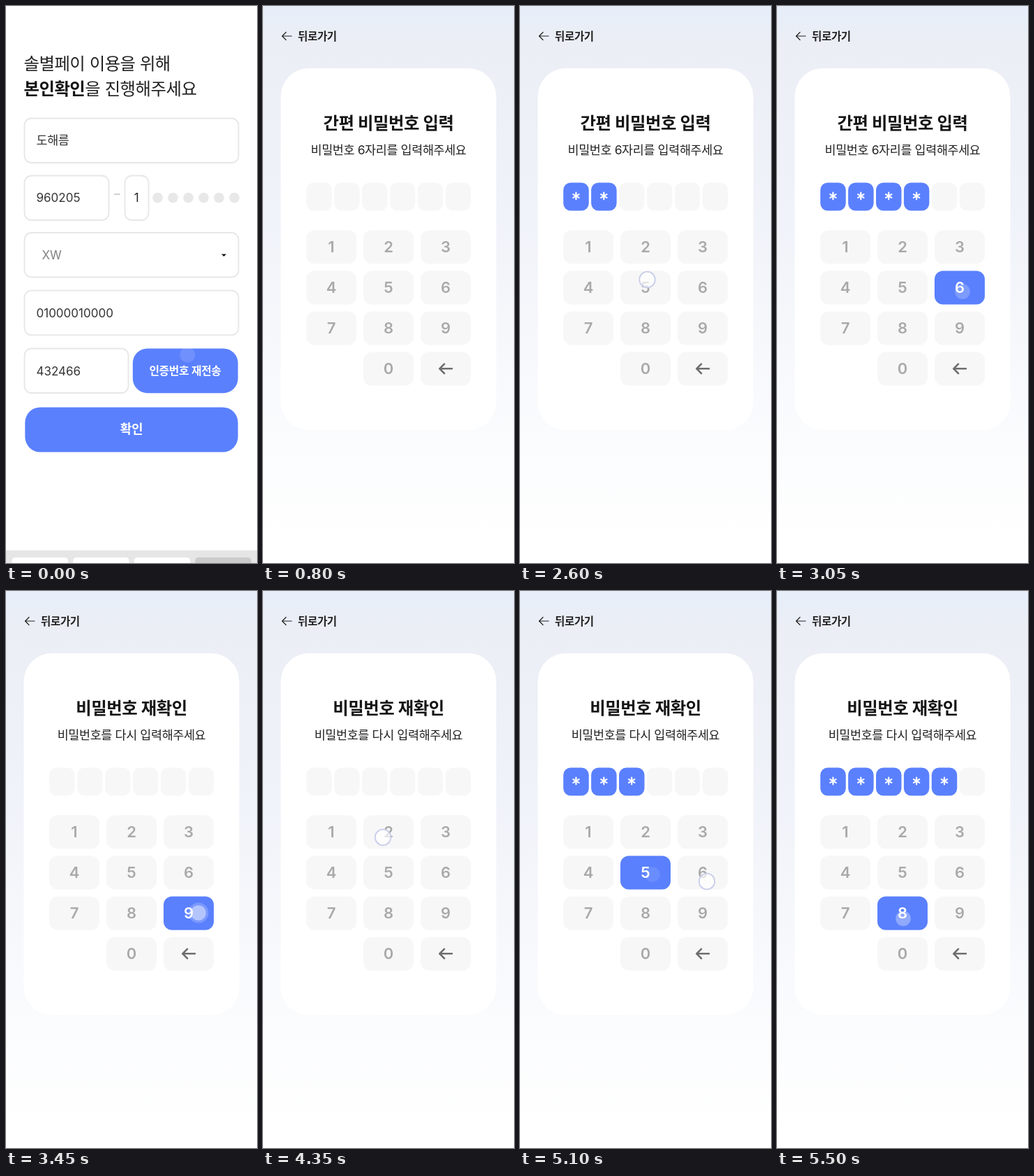
These frames come from a looping animation (360 px wide and 796 px high, 5.55 s). An HTML page:

```html
<!DOCTYPE html>
<html lang="ko">
<head>
<meta charset="utf-8">
<title>PIN</title>
<style>
  html, body { margin: 0; width: 100%; height: 100%; overflow: hidden; background: #fff; }
  svg { display: block; width: 360px; height: 796px; }
  text { font-family: Inter, "Noto Sans CJK KR", "Noto Sans CJK", sans-serif; white-space: pre; }
  .ko { letter-spacing: -.02em; }
  .mid { text-anchor: middle; }
</style>
</head>
<body>
<svg id="stage" viewBox="0 0 360 796" xmlns="http://www.w3.org/2000/svg">
  <defs>
    <linearGradient id="sky" x2="0" y2="1">
      <stop offset="0" stop-color="#e6eefa"/>
      <stop offset=".06" stop-color="#ebeef5"/>
      <stop offset=".4" stop-color="#f0f3f9"/>
      <stop offset=".75" stop-color="#fafbfd"/>
      <stop offset=".97" stop-color="#fff"/>
    </linearGradient>
  </defs>
</svg>
<script>
const LOOP = 5550, STEP = 50, RECHECK = 3450;
const BLUE = '#5a80fd', PALE = '#f7f7f7';
const stage = document.getElementById('stage');

function add(parent, tag, attrs, content = '') {
  const node = document.createElementNS(stage.namespaceURI, tag);
  for (const key in attrs) node.setAttribute(key, attrs[key]);
  node.textContent = content;
  return parent.appendChild(node);
}
const group = parent => add(parent, 'g', {});
const rect = (parent, x, y, width, height, rx, fill, more) =>
  add(parent, 'rect', { x, y, width, height, rx, fill, ...more });
const label = (parent, content, x, y, size, weight, fill, cls = '') =>
  add(parent, 'text', { x, y, 'font-size': size, 'font-weight': weight, fill, class: cls }, content);
const stroke = (parent, d, color, width) =>
  add(parent, 'path', { d, fill: 'none', stroke: color, 'stroke-width': width,
    'stroke-linecap': 'round', 'stroke-linejoin': 'round' });
const clamp = (v, lo = 0, hi = 1) => Math.min(hi, Math.max(lo, v));

// PIN screen
const pin = group(stage);
rect(pin, 0, 0, 360, 796, 0, 'url(#sky)');
stroke(pin, 'M41 43H27.5M33 37.5L27.5 43L33 48.5', '#222', 1.2);
label(pin, '뒤로가기', 50, 48.6, 15.5, 600, '#222', 'ko');
rect(pin, 25.5, 89, 309, 517, 40, '#fff');
const title = label(pin, '', 180, 175.5, 24.4, 600, '#151515', 'ko mid');
const hint = label(pin, '', 180, 211.5, 17.4, 400, '#222', 'ko mid');

const slots = Array.from({ length: 6 }, (_, i) => {
  const x = 62.2 + i * 39.9, cx = x + 18.2;
  rect(pin, x, 252.5, 36.5, 40, 10.5, PALE);
  const filled = group(pin);
  rect(filled, x, 252.5, 36.5, 40, 10.5, BLUE);
  for (const angle of [0, 60, 120])
    stroke(filled, `M${cx} 266.7v9.6`, '#fff', 2.2).setAttribute('transform', `rotate(${angle} ${cx} 271.5)`);
  return filled;
});

const keys = {};
for (const digit of [1, 2, 3, 4, 5, 6, 7, 8, 9, 0]) {
  const place = digit ? digit - 1 : 10;
  const x = 62 + place % 3 * 82, y = 320.5 + Math.floor(place / 3) * 58;
  const face = (parent, back, ink) => {
    rect(parent, x, y, 72, 48, 12, back);
    label(parent, digit, x + 36, y + 31.7, 22, 600, ink, 'mid');
  };
  face(pin, PALE, '#a9a9a9');
  keys[digit] = group(pin);
  face(keys[digit], BLUE, '#fff');
}
rect(pin, 226, 494.5, 72, 48, 12, PALE);
stroke(pin, 'M271 518.3H253.5M260 511.6L253.3 518.3L260 525', '#6e6e6e', 2.6);

// [start, digit, x, y]
const presses = [
  [1900, 2, 176, 350], [2250, 3, 266, 351], [2600, 5, 182.5, 391],
  [2850, 6, 266, 408], [3100, 8, 180, 464], [3350, 9, 276, 460],
  [4350, 2, 172, 352], [4600, 3, 264, 352], [4850, 5, 190, 405],
  [5100, 6, 268, 415], [5350, 8, 181, 468]
].map(([start, digit, cx, cy]) => ({
  start, digit,
  ring: add(pin, 'circle', { cx, cy, r: 11.3, fill: '#fff', 'fill-opacity': .68, stroke: '#c9ceea', 'stroke-width': 1.8 }),
  halo: add(pin, 'circle', { cx, cy, r: 14.5, fill: '#fff' }),
  dot: add(pin, 'circle', { cx, cy, r: 10.8, fill: '#fff' })
}));

// Identity form
const form = group(stage);
rect(form, 0, 0, 360, 796, 0, '#fff');
label(form, '솔별페이 이용을 위해', 25.5, 90.7, 24.4, 300, '#222', 'ko');
const lead = label(form, '', 25.5, 126.7, 24.4, 300, '#222', 'ko');
add(lead, 'tspan', { 'font-weight': 700, fill: '#151515' }, '본인확인');
add(lead, 'tspan', {}, '을 진행해주세요');

const field = (x, y, w) => rect(form, x, y, w, 63.5, 10, '#fff', { stroke: '#e7e7e7', 'stroke-width': 1.8 });
field(26.5, 160.5, 307);
field(26.5, 242.5, 121);
field(170.5, 242.5, 34);
field(26.5, 324, 307);
field(26.5, 406.7, 307);
field(26.5, 489.5, 149);
label(form, '도해름', 43.5, 198, 17.4, 400, '#333', 'ko');
label(form, '960205', 43.5, 280.2, 17, 400, '#333');
rect(form, 155, 268, 8.5, 2, 0, '#cfcfcf');
label(form, '1', 187.3, 280.2, 17, 400, '#222', 'mid');
for (let i = 0; i < 6; i++) add(form, 'circle', { cx: 217.5 + i * 22, cy: 274, r: 7.3, fill: '#e8e8e8' });
label(form, 'XW', 51.5, 362, 17, 400, '#808080');
add(form, 'path', { d: 'M309 354.6h7l-3.5 3.5z', fill: '#111' });
label(form, '01000010000', 43.5, 444.5, 17, 400, '#333');
label(form, '432466', 43.5, 527.5, 17, 400, '#333');
rect(form, 181.8, 489.4, 150.9, 63.8, 21, BLUE);
add(form, 'circle', { cx: 260.3, cy: 498.5, r: 11, fill: '#fff', opacity: .13 });
label(form, '인증번호 재전송', 257, 526.8, 15.8, 600, '#fff', 'ko mid');
rect(form, 27.3, 573.4, 305.4, 64.2, 22, BLUE);
label(form, '확인', 180, 611.3, 18, 600, '#fff', 'ko mid');

const keyboard = group(form);
rect(keyboard, 0, 778, 360, 18, 0, '#e6e6e6');
for (let i = 0; i < 4; i++) rect(keyboard, 8.5 + i * 87.6, 788, 80.5, 30, 5, i < 3 ? '#fff' : '#cbcbcb');

function draw(t) {
  form.setAttribute('opacity', t < 100 ? 1 : clamp((300 - t) / 250));
  keyboard.setAttribute('opacity', t < 100 ? 1 : 0);

  const recheck = t >= RECHECK;
  title.textContent = recheck ? '비밀번호 재확인' : '간편 비밀번호 입력';
  hint.textContent = recheck ? '비밀번호를 다시 입력해주세요' : '비밀번호 6자리를 입력해주세요';

  for (const digit in keys) keys[digit].setAttribute('opacity', 0);
  let typed = 0;
  for (const { start, digit, ring, halo, dot } of presses) {
    const age = t - start, held = age >= STEP && age < 300;
    ring.setAttribute('opacity', age >= 0 && age < STEP ? 1 : 0);
    dot.setAttribute('opacity', held ? .65 - .0022 * age : 0);
    halo.setAttribute('opacity', held ? .2 * clamp((150 - age) / 50) : 0);
    if (held) keys[digit].setAttribute('opacity', clamp(Math.min(age / 75, (300 - age) / 50)));
    if (age >= STEP && (start > RECHECK) === recheck) typed++;
  }
  slots.forEach((slot, i) => slot.setAttribute('opacity', i < typed ? 1 : 0));
}

const origin = performance.now();
function tick() {
  const t = (performance.now() - origin) % LOOP;
  draw(Math.floor(t / STEP) * STEP);
  requestAnimationFrame(tick);
}
tick();
</script>
</body>
</html>
```
